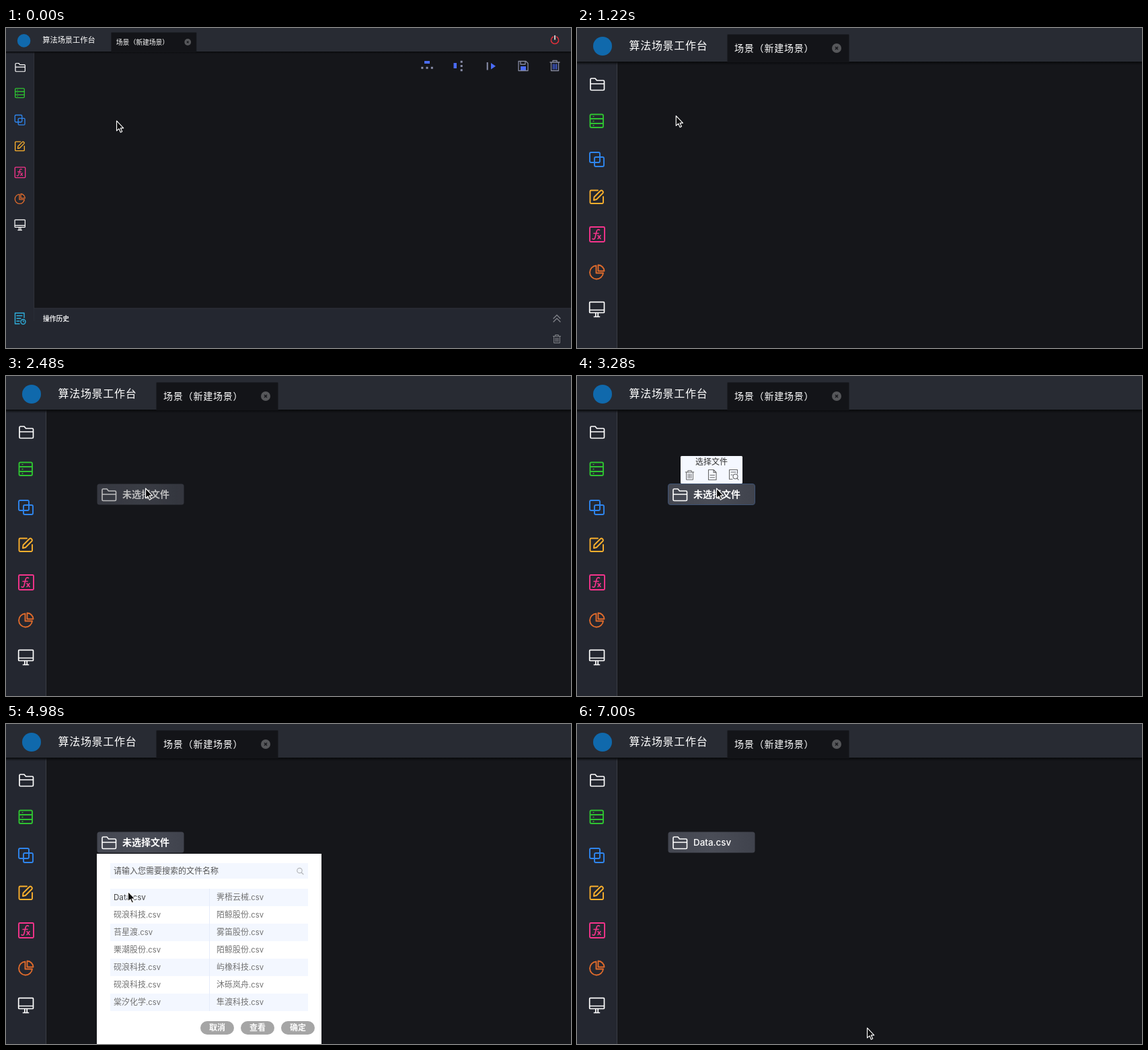
Recreate the animation shown at these times as an HTML page. Size 840 px wide and 476 px high, loop 7.96 s.

```html
<!DOCTYPE html>
<html lang="zh-CN">
<head>
<meta charset="utf-8">
<title>场景</title>
<style>
html, body { margin: 0; width: 100%; height: 100%; overflow: hidden; background: #15161a; }
svg { display: block; font-family: Inter, 'Noto Sans CJK SC', 'Noto Sans CJK', sans-serif; }
.line { fill: none; stroke: currentColor; stroke-width: var(--w, 1.9); stroke-linejoin: round; stroke-linecap: round; }
.mid { text-anchor: middle; }
</style>
</head>
<body>
<svg width="840" height="476" viewBox="0 0 840 476">
  <defs>
    <linearGradient id="shade" x2="0" y2="1">
      <stop stop-color="#08090b"/><stop offset="1" stop-color="#08090b" stop-opacity="0"/>
    </linearGradient>
    <linearGradient id="nodeFill">
      <stop stop-color="#444751"/><stop offset=".5" stop-color="#4a4d57"/><stop offset="1" stop-color="#40434d"/>
    </linearGradient>
    <path id="folder" class="line" d="M1 17V2.500Q1 1 2.500 1H8L10.500 4H20Q21.500 4 21.500 5.500V17Q21.500 18.500 20 18.500H2.500Q1 18.500 1 17ZM1 9H21.500"/>
    <path id="bin" class="line" d="M-7-5H7M-3-5V-7.500H3V-5M-5.500-5V7.500H5.500V-5"/>
    <path id="binBars" class="line" d="M-2.500-2V5M0-2V5M2.500-2V5"/>
  </defs>

  <g id="page">
    <rect width="1210" height="800" fill="#15161a"/>
    <rect y="50" width="59.500" height="700" fill="#242730"/>
    <path d="M59.500 50V750" stroke="#3b3e45"/>
    <rect id="hover" y="50" width="60" height="60" fill="#15161a"/>
    <rect y="50" width="1210" height="5" fill="url(#shade)"/>
    <rect width="1210" height="50" fill="#282b33"/>
    <circle cx="38" cy="27" r="14" fill="#1069ac"/>
    <text id="title" x="77.500" y="31.500" font-size="16" fill="#fff">算法场景工作台</text>
    <rect x="223" y="9" width="182" height="42" rx="2" fill="#1d1f25"/>
    <rect x="224" y="10" width="180" height="41" fill="#131418"/>
    <text id="tab" x="234" y="35.300" font-size="14" fill="#fff">场景（新建场景）</text>
    <circle cx="386" cy="30" r="7" fill="#56575a"/>
    <path d="M384 28L388 32M388 28L384 32" stroke="#17181c" stroke-width="1.500"/>

    <use id="fileTool" href="#folder" x="19" y="74" color="#fff"/>
    <g class="line" color="#2fc331">
      <rect x="19.500" y="128.500" width="19.500" height="19.500" rx="2"/>
      <path d="M20 135H39M20 142H39"/>
      <path d="M24 131.700H25M24 138.500H25M24 145H25" stroke-width="1.300"/>
    </g>
    <g class="line" color="#2f86ee">
      <rect x="19" y="185" width="15" height="15" rx="2"/><rect x="26" y="192" width="14" height="14" rx="2"/>
    </g>
    <g class="line" color="#fbb02d">
      <path d="M31 241.500H21Q19.500 241.500 19.500 243V259.500Q19.500 261 21 261H37.500Q39 261 39 259.500V251"/>
      <path d="M25 256L25.500 251.500 35 242Q36.500 241 38 242.500T38.500 245.500L29 255Z"/>
    </g>
    <g class="line" color="#f5348c">
      <rect x="19" y="296" width="22" height="22" rx="1.500"/>
      <path d="M33.500 300.500Q30 298.500 29 303L27 311.500Q26 315.500 23 313.500M25 305.500H32M31 308.500L35 313.500M35 308.500L31 313.500" stroke-width="1.600"/>
    </g>
    <g class="line" color="#df6b2c">
      <path d="M28.500 353.500A10 10 0 1 0 39 364.500H28.500Z"/>
      <path d="M31.500 352.500V361.500H40.500A9.500 9.500 0 0 0 31.500 352.500Z"/>
    </g>
    <g class="line" color="#fff" style="--w: 1.7">
      <rect x="18.700" y="407.700" width="21.800" height="15.800" rx="1"/>
      <path d="M19 419.500H40M27.800 424V429M31.200 424V429M25.500 429.500H33.500"/>
    </g>

    <g transform="scale(1.42857)">
      <path fill="#4a6bf5" d="M622 49H630V53H622ZM665.500 52H670V60H665.500ZM721 52L728 56.700 721 61.500ZM765 57H773V63.500H765Z"/>
      <path fill="#8a8fab" d="M617.300 57.700h3v3h-3zM624.500 57.700h3v3h-3zM631.800 57.700h3v3h-3zM675.700 48.700h3v3h-3zM675.700 55h3v3h-3zM675.700 61.300h3v3h-3zM714.700 51h2v11.500h-2z"/>
      <g style="--w: 1.3" color="#85899f">
        <path class="line" d="M762 49.500H773L776 52.500V63.500H762ZM765 49.500V54H772V49.500"/>
        <g transform="translate(816 56)"><use href="#bin"/><use href="#binBars" color="#4a6bf5"/></g>
      </g>
      <g style="--w: 1.5">
        <path class="line" color="#e0303a" d="M813.500 13A5.600 5.600 0 1 0 818.500 13"/>
        <path class="line" color="#fff" d="M816 11.500V17"/>
      </g>
      <g id="panel">
        <rect y="417" width="850" height="120" fill="#242730"/>
        <path d="M42 417H850" stroke="#32353d"/>
        <path d="M41.700 416V436" stroke="#30333b" stroke-width=".7"/>
        <text x="55" y="435.700" font-size="9.800" font-weight="600" fill="#e0e1e3">操作历史</text>
        <g style="--w: 1.2" color="#85878d">
          <path class="line" d="M814 432L819 427 824 432M814 437L819 432 824 437"/>
          <g transform="translate(819 462.500) scale(.8)"><use href="#bin"/><use href="#binBars"/></g>
        </g>
        <g style="--w: 1.4" color="#2fb0dd">
          <path class="line" d="M20 440H13.500V424H27V431M16 428H24M16 432H22M16 436H20"/>
          <circle class="line" cx="25.500" cy="437" r="3.500"/>
          <path class="line" d="M25.500 435V437H27" style="--w: 1"/>
        </g>
      </g>
    </g>
  </g>

  <g id="node">
    <rect id="nodeBox" x="135.500" y="160.500" width="129" height="31" rx="3.500" fill="url(#nodeFill)"/>
    <use href="#folder" x="142" y="167" color="#fff" style="--w: 1.6"/>
    <text id="nodeName" x="173" fill="#fff"></text>
  </g>

  <g id="menu">
    <rect x="154" y="119" width="92" height="41" rx="1.500" fill="#f5f8ff"/>
    <text class="mid" x="200" y="132.300" font-size="12" fill="#333">选择文件</text>
    <g style="--w: 1.1" color="#666">
      <g transform="translate(167.500 147.500) scale(.9)"><use href="#bin"/><use href="#binBars"/></g>
      <path class="line" d="M195.500 139.500H203L207 143.500V154.500H195.500ZM203 139.500V143.500H207M198 147.500H204.500M198 151H204.500"/>
      <path class="line" d="M231 153.500H226.500V139.500H238.500V145M229 143H236M229 147H231M238 152L240 154.500"/>
      <circle class="line" cx="235.500" cy="149.500" r="3.500"/>
    </g>
  </g>

  <g id="dialog">
    <rect x="135" y="193" width="334" height="283" fill="#fff"/>
    <rect x="155" y="207" width="294" height="23" fill="#f3f7ff"/>
    <text x="160" y="223.300" font-size="12" fill="#555">请输入您需要搜索的文件名称</text>
    <g class="line" color="#b4b6ba" style="--w: 1.2"><circle cx="436.500" cy="218" r="3.700"/><path d="M439.300 221L442 223.500"/></g>
    <g id="table"></g>
  </g>

  <path id="cursor" d="M.5.200V14.900L3.900 11.800 6.300 17.200 8.700 16.100 6.300 10.900H10.700Z" fill="#0b0b0c" stroke="#fff" stroke-width="1.150" stroke-linejoin="round"/>
</svg>
<script>
const LOOP = 7960;
const $ = id => document.getElementById(id);
const el = Object.fromEntries(
  ['page', 'hover', 'title', 'tab', 'fileTool', 'panel', 'node', 'nodeBox', 'nodeName', 'menu', 'dialog', 'cursor']
    .map(id => [id, $(id)]));

const leftFiles = ['Data', '砚浪科技', '苔星渡', '栗潮股份', '砚浪科技', '砚浪科技', '棠汐化学'];
const rightFiles = ['霁梧云械', '陌鲸股份', '雾笛股份', '陌鲸股份', '屿橡科技', '沐砾岚舟', '隼渡科技'];

function fileCell(name, x, y, id = '') {
  return `<text ${id} x="${x}" y="${y}" font-size="12" fill="#727272">${name === 'Data'
    ? '<tspan font-size="11.6">Data.csv</tspan>'
    : `${name}<tspan font-size="11.3">.csv</tspan>`}</text>`;
}

let rows = '';
leftFiles.forEach((name, i) => {
  const top = 245 + 26 * i;
  if (i % 2 === 0) rows += `<rect x="155" y="${top}" width="294" height="26" fill="#f3f7ff"/>`;
  rows += fileCell(name, 160, top + 17.4, i ? '' : 'id="picked"') + fileCell(rightFiles[i], 313, top + 17.4);
});
rows += '<path d="M302.500 245V427" stroke="#e6ecfa"/>';
['取消', '查看', '确定'].forEach((label, i) => {
  const x = 289 + 60 * i;
  rows += `<rect x="${x}" y="442" width="50" height="20" rx="10" fill="#a5a5a5"/>
    <text class="mid" x="${x + 25}" y="456.400" font-size="12" font-weight="600" fill="#fff">${label}</text>`;
});
$('table').innerHTML = rows;
const picked = $('picked');

const ramp = (t, from, to) => Math.min(1, Math.max(0, (t - from) / (to - from)));
const ease = p => p < .5 ? 4 * p ** 3 : 1 - 4 * (1 - p) ** 3;
const smooth = p => p * p * (3 - 2 * p);
const show = (node, on) => node.setAttribute('visibility', on ? 'visible' : 'hidden');
const set = (node, attrs) => {
  for (const name in attrs) node.setAttribute(name, attrs[name]);
};

// Each move: target x, y and its time span; y may have a span of its own.
const moves = [
  [49, 87.5, 980, 1700],
  [207, 167, 1930, 2100],
  [200, 149, 3480, 3800],
  [180, 254, 4100, 5240],
  [431, 452, 5450, 6927, 5542, 6768],
];

function cursorAt(t) {
  let x = 164, y = 138;
  for (const [toX, toY, from, to, fromY = from, endY = to] of moves) {
    x += (toX - x) * ease(ramp(t, from, to));
    y += (toY - y) * ease(ramp(t, fromY, endY));
  }
  return [x, y];
}

function draw(t) {
  const wide = t < 960;
  const zoom = wide ? 0 : smooth(ramp(t, 940, 1150));
  set(el.page, {
    transform: `translate(0 ${-2.2 * Math.sin(Math.PI * zoom)}) scale(${.7 + .3 * zoom})`
  });
  set(el.panel, { transform: `translate(0 ${-20 * Math.min(1, zoom / .46)})` });
  for (const [label, spacing] of [[el.title, .7], [el.tab, .8]]) {
    set(label, { 'letter-spacing': wide ? 0 : spacing, 'font-weight': wide ? 500 : 400 });
  }

  const [x, y] = cursorAt(t);
  const hovering = x < 60 && t < 2100;
  show(el.hover, hovering);
  el.fileTool.style.setProperty('--w', hovering ? 2 : 1.7);
  set(el.cursor, { transform: `translate(${x} ${y})` });

  const chosen = t >= 7000;
  set(el.node, { opacity: ramp(t, 2240, 2580) });
  set(el.nodeBox, { stroke: t >= 3040 && t < 4080 ? '#3d5273' : 'none' });
  el.nodeName.textContent = chosen ? 'Data.csv' : '未选择文件';
  set(el.nodeName, chosen
    ? { 'font-size': 13.4, 'font-weight': 500, y: 181 }
    : { 'font-size': 14, 'font-weight': 600, y: 181.2 });

  set(el.menu, { opacity: t < 4080 ? smooth(ramp(t, 3020, 3280)) : 0 });
  show(el.dialog, t >= 4080 && !chosen);
  set(picked, t >= 5500
    ? { 'font-weight': 600, fill: '#222' }
    : { 'font-weight': 400, fill: '#444' });
}

const start = performance.now();
function tick() {
  draw((performance.now() - start) % LOOP);
  requestAnimationFrame(tick);
}
draw(0);
requestAnimationFrame(tick);
</script>
</body>
</html>
```
